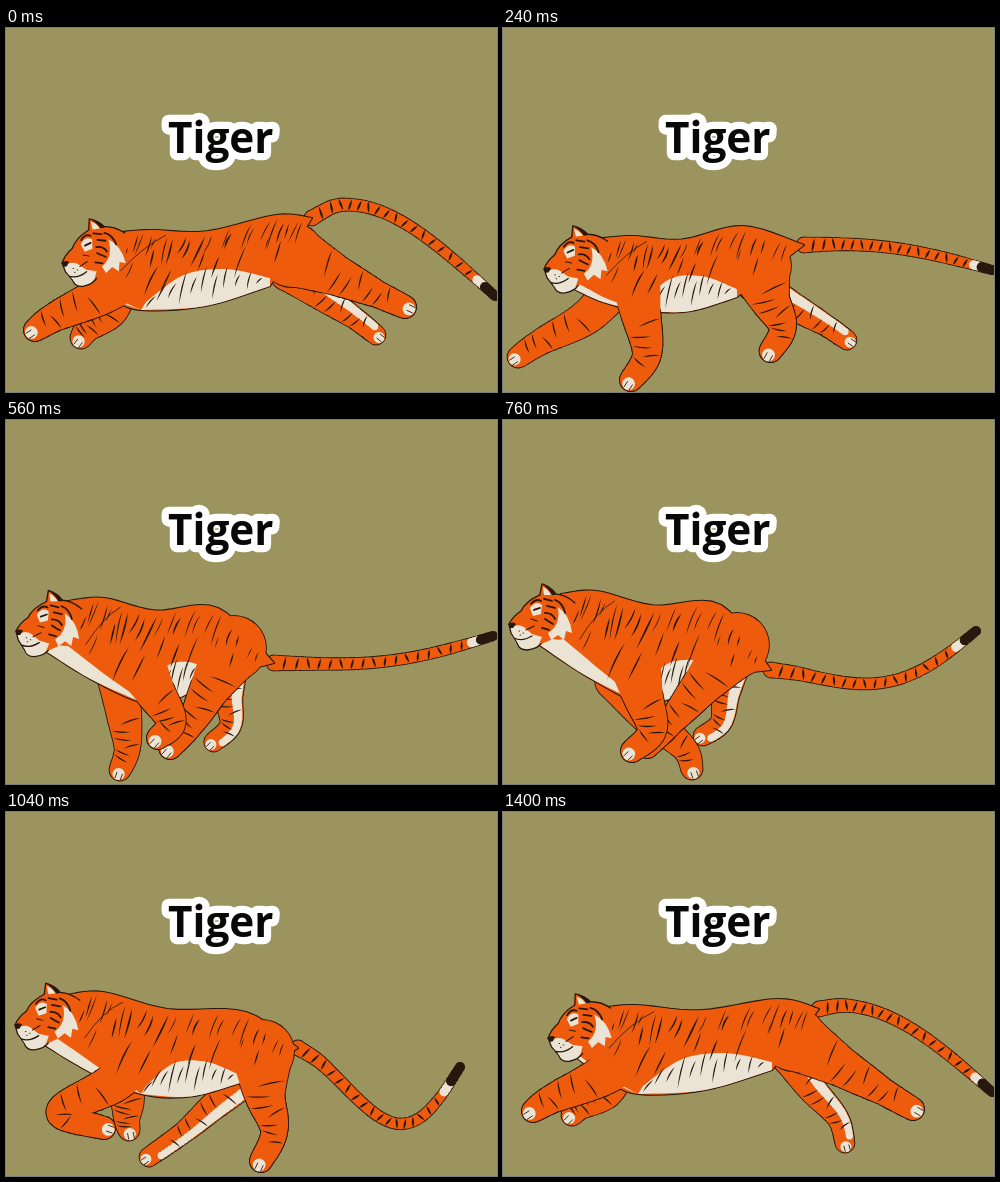
Animation, 491 px wide and 364 px high, one loop 1.44 s. Source, as an HTML page:

```html
<!DOCTYPE html>
<html lang="en">
<head>
<meta charset="utf-8">
<title>Tiger</title>
<style>
html, body { margin: 0; width: 100%; height: 100%; overflow: hidden; background: #9c945f; }
svg { display: block; width: 491px; height: 364px; }
text { font: 700 42.3px "Open Sans", sans-serif; fill: #080808; stroke: #fff; stroke-width: 14.5px; stroke-linejoin: round; paint-order: stroke; }
</style>
</head>
<body>
<svg viewBox="0 0 491 364">
  <rect width="491" height="364" fill="#9c945f"/>
  <text x="162" y="125">Tiger</text>
  <g id="cat" stroke-linecap="round" stroke-linejoin="round"></g>
  <g id="head" fill="none" stroke-linecap="round" stroke-linejoin="round">
    <path fill="#ee5b0d" d="M0 1Q4-7 12-12Q17-22 29-27L33-39Q42-36 47-29Q58-28 66-20L64 9Q56 19 44 16L30 22Q20 27 8 21L2 10Z"/>
    <path fill="#ebe4d4" d="M1 5Q8 0 15 4L23 11L33 14L30 21Q26 27 17 27Q9 26 7 20L3 13ZM49-16Q61-8 63 10L57 8L55 17L49 12L42 17L39 10Q52 2 49-16ZM21-15Q27-23 33-18L32-9L24-7ZM35-28L34-36Q40-33 42-28Z"/>
    <path stroke="#27180f" stroke-width="1.3" d="M66-20Q57-28 47-29Q42-36 33-39L31-28Q17-22 12-12Q4-7 0 1L2 10L8 20Q10 27 18 27Q28 26 32 21M5 15Q13 19 23 13"/>
    <path fill="#27180f" d="M-1 1Q4-2 7 1L4 5L1 5ZM33-39Q43-36 47-28L43-28Q39-35 33-39Z"/>
    <path stroke="#27180f" stroke-width="1.8" d="M25-13L31-15M22-19Q27-25 32-22M35-24L43-22M38-17L46-15M36-10Q43-10 46-4M36-4Q42 0 44 1M33 5L40 7M46-23Q54-20 56-10"/>
    <path stroke="#27180f" stroke-width="1" d="M10 8h.5M14 10h.5M11 12h.5M17 7L25 3M22-4L28-2"/>
  </g>
</svg>
<script>
const LOOP = 1440, STEP = 40;
const ORANGE = '#ee5b0d', CREAM = '#ebe4d4', INK = '#27180f';

// Guide points of the gallop; the rest of the body follows from them
const KEYS = [0, 240, 560, 760, 1040, 1200, 1400];
const gait = {
  nose: [[56, 234], [41, 240], [10, 210], [6, 203], [9, 212], [20, 229], [45, 225]],
  croup: [[270, 187], [240, 198], [212, 188], [218, 185], [240, 200], [280, 206], [275, 187]],
  dock: [[306, 190], [301, 217], [268, 243], [268, 250], [292, 236], [316, 213], [316, 197]],
  tailTip: [[489, 268], [489, 242], [487, 216], [473, 211], [454, 255], [478, 303], [489, 280]],
  tailSag: [[-36], [-9], [12], [34], [64], [44], [-26]],
  nearFore: [[29, 302], [130, 352], [152, 318], [130, 331], [98, 316], [32, 322], [30, 299]],
  farFore: [[75, 310], [16, 329], [116, 350], [191, 349], [123, 318], [68, 308], [69, 303]],
  fold: [[0], [8], [18], [16], [-50], [-8], [0]],
  nearHind: [[399, 279], [268, 323], [165, 328], [145, 327], [257, 349], [352, 345], [410, 297]],
  farHind: [[370, 307], [344, 312], [208, 322], [200, 316], [145, 345], [242, 344], [343, 331]]
};

const N = KEYS.length;
const cat = document.getElementById('cat'), head = document.getElementById('head');

const when = k => KEYS[(k + N) % N] + LOOP * Math.floor(k / N);

// Periodic cubic through the guide points, without overshoot
function pose(track, t) {
  let k = N - 1;
  while (KEYS[k] > t) k--;
  const h = when(k + 1) - when(k), s = (t - when(k)) / h, q = s * s * (3 - 2 * s);
  return track[0].map((_, i) => {
    const at = j => track[(j + N) % N][i];
    const slope = j => (at(j + 1) - at(j)) / (when(j + 1) - when(j));
    const tangent = j => {
      const a = slope(j - 1), b = slope(j);
      return a * b > 0 ? 2 * a * b / (a + b) : 0;
    };
    return at(k) * (1 - q) + at(k + 1) * q +
      h * s * (1 - s) * ((1 - s) * tangent(k) - s * tangent(k + 1));
  });
}

const clamp = (v, lo, hi) => Math.max(lo, Math.min(hi, v));
const add = (p, x, y) => [p[0] + x, p[1] + y];
const shift = (p, dir, d) => add(p, dir[0] * d, dir[1] * d);
const mix = (a, b, v) => [a[0] + (b[0] - a[0]) * v, a[1] + (b[1] - a[1]) * v];
const f = p => p[0].toFixed(1) + ' ' + p[1].toFixed(1);
const run = pts => 'M' + pts.map(f).join('L');
const fill = (d, c) => `<path d="${d}" fill="${c}"/>`;
const line = (d, w) => `<path d="${d}" fill="none" stroke="${INK}" stroke-width="${w}"/>`;

// Point on a smooth curve through pts, u from 0 to 1
function along(pts, u) {
  const last = pts.length - 1, k = clamp(Math.floor(u * last), 0, last - 1), s = u * last - k;
  return [0, 1].map(c => {
    const [a, b, d, e] = [-1, 0, 1, 2].map(j => pts[clamp(k + j, 0, last)][c]);
    return b + s / 2 * (d - a + s * (2 * a - 5 * b + 4 * d - e + s * (3 * (b - d) + e - a)));
  });
}
const span = (pts, a, b, n = 28) =>
  Array.from({ length: n + 1 }, (_, i) => along(pts, a + (b - a) * i / n));

// Tapered stripe, slightly bowed
function leaf(a, b, w, bow = 0) {
  const dx = b[0] - a[0], dy = b[1] - a[1], len = Math.hypot(dx, dy) || 1;
  const nrm = [-dy / len, dx / len], m = mix(a, b, .45);
  return `M${f(a)}Q${f(shift(m, nrm, bow + w))} ${f(b)}Q${f(shift(m, nrm, bow - w))} ${f(a)}Z`;
}

// Evenly spaced discs along a spine
function discs(spine, radii, n) {
  return Array.from({ length: n + 1 }, (_, i) => {
    const u = i / n, a = along(spine, Math.max(0, u - .01)), b = along(spine, Math.min(1, u + .01));
    const len = Math.hypot(b[0] - a[0], b[1] - a[1]) || 1;
    const dir = [(b[0] - a[0]) / len, (b[1] - a[1]) / len];
    const k = Math.min(radii.length - 2, Math.floor(u * (radii.length - 1)));
    const r = radii[k] + (radii[k + 1] - radii[k]) * (u * (radii.length - 1) - k);
    return { c: along(spine, u), r, dir, nrm: [-dir[1], dir[0]] };
  });
}
const ring = (p, q) =>
  `M${f(add(p, -q, 0))}a${q} ${q} 0 1 0 ${2 * q} 0a${q} ${q} 0 1 0 ${-2 * q} 0`;
const round = (list, grow = 0, side = 0, size = 1) =>
  list.map(({ c, r, nrm }) => ring(shift(c, nrm, r * side), r * size + grow)).join('');

// A planted paw points forward, so its ankle moves back
function chain(root, knee, ankle, toe) {
  const plant = clamp((toe[1] - 318) / 25, 0, 1);
  return [root, knee, add(ankle, 6 * plant, -3 * plant), add(toe, -2 * plant, 0)];
}
function foreLeg(root, toe, fold) {
  return chain(root, add(mix(root, toe, .36), 5 + fold * .3, 5), add(mix(root, toe, .8), fold, 0), toe);
}
// A shortened hind leg pushes its hock back
function hindLeg(root, toe, reach) {
  const dx = toe[0] - root[0], dy = toe[1] - root[1], d = Math.hypot(dx, dy);
  const aft = [dy / d, -dx / d], bend = Math.max(0, reach - d) * .35;
  return chain(root, shift(mix(root, toe, .38), aft, bend * .4), shift(mix(root, toe, .75), aft, bend), toe);
}

function limb(all, { edge = 0, pale = 0, from = .25 }) {
  const n = all.length - 1, end = all[n];
  let out = fill(round(all.slice(Math.round(edge * n)), .9), INK) + fill(round(all), ORANGE);
  if (pale) out += fill(round(all.slice(4, 33), -.3, pale * .58, .4), CREAM);
  out += fill(ring(shift(end.c, end.dir, end.r * .4), end.r * .58), CREAM);
  let bars = '';
  for (let u = from, i = 0; u < .8; u += .085, i++) {
    const { c, r, nrm, dir } = all[Math.round(u * n)], side = i % 3 ? 1 : -1;
    bars += leaf(shift(c, nrm, side * r * .95), shift(shift(c, nrm, -side * r * .3), dir, 4), 1.4, 1.5);
  }
  const claws = [-.35, .2].map(k => {
    const p = shift(end.c, end.nrm, end.r * k);
    return run([shift(p, end.dir, end.r * .3), shift(p, end.dir, end.r * .85)]);
  }).join('');
  return out + fill(bars, INK) + line(claws, .9);
}

function drawTail(base, tip, sag) {
  const spine = Array.from({ length: 9 }, (_, i) => {
    const u = i / 8;
    return add(mix(base, tip, u), 0, sag * Math.sin(Math.PI * u ** (1 + sag / 150)));
  });
  const n = 80, all = discs(spine, [7.5, 6, 5.6, 5.4, 5.2, 4.2], n);
  let bars = '';
  for (let i = 4; i < 71; i += 4) {
    const { c, r, nrm, dir } = all[i], side = i % 3 ? 1 : -1;
    bars += leaf(shift(c, nrm, side * r), shift(shift(c, nrm, -side * r * .9), dir, 3), 2.2);
  }
  return fill(round(all, .9), INK) + fill(round(all), ORANGE) + fill(bars, INK) +
    fill(round(all.slice(72, 76)), CREAM) + fill(round(all.slice(75), .6), INK);
}

// Fixed coat pattern
let seed = 11;
const rnd = () => (seed = seed * 16807 % 2147483647) / 2147483647;
const coat = Array.from({ length: 30 }, (_, i) => ({
  u: .17 + .76 * i / 29, v: i % 3 ? .02 + rnd() * .1 : .25 + rnd() * .25,
  len: .16 + rnd() * .25, w: .8 + rnd() * 1.1, bow: rnd() * 5 - 2.5, lean: .2 + rnd() * .35
}));

function draw(t) {
  const p = {};
  for (const name in gait) p[name] = pose(gait[name], t);
  const swing = Math.cos(2 * Math.PI * t / LOOP), chest = 11 - 8 * swing;

  const withers = add(p.nose, 88, -32), shoulder = [130, 236], brisket = [135, 282];
  const dip = add(mix(withers, p.croup, .45), 0, 8);
  const top = [add(p.nose, 52, -29), withers, dip, p.croup, p.dock];
  const hip = add(p.croup, 16, 40), groin = add(hip, -22, 31), throat = add(p.nose, 28, 20);
  const bib = [throat, add(mix(throat, brisket, .5), -2, 3), brisket];
  const belly = [brisket, add(mix(brisket, groin, .5), 0, 8), groin];
  const low = [...bib, ...belly.slice(1)];
  const flank = [add(brisket, 5, -8), add(mix(brisket, groin, .33), 0, -27),
    add(mix(brisket, groin, .66), 0, -25), add(groin, 0, -8)];
  const at = (u, v) => mix(along(top, u), along(low, u), v);

  const n = 36;
  const hind = discs(hindLeg(hip, p.nearHind, 125), [32, 20, 13, 11], n);
  const fore = discs(foreLeg(shoulder, p.nearFore, p.fold[0]), [28, 20, 14, 11], n);
  const hind2 = discs(hindLeg(add(hip, -4, 18), p.farHind, 112), [18, 14, 10.5, 9.5], n);
  const fore2 = discs(foreLeg([112, 260], p.farFore, 0), [20, 17, 12.5, 10.5], n);

  let out = drawTail(p.dock, p.tailTip, p.tailSag[0]) +
    limb(hind2, { pale: -1 }) + limb(fore2, { from: .35 });

  // Outlines go under the fills, so only the silhouette keeps them
  const trunk = run([...span(top, 0, 1), ...span(low, 1, 0)]) + 'Z';
  out += line(trunk, 2.2) + fill(round(hind, .9) + round(fore, .9), INK) + fill(trunk, ORANGE);
  out += fill(run([...span(flank, 0, 1), ...span(belly, 1, 0)]) + 'Z', CREAM);
  const collar = span(bib, 0, 1, 14);
  const inner = collar.map((q, i) => shift(q, [.75, -.7], chest * Math.cos(i / 14 * Math.PI / 2)));
  out += fill(run([...collar, ...inner.reverse()]) + 'Z', CREAM);

  let ribs = '';
  for (let i = 0; i < 11; i++) {
    const u = .12 + i * .08, a = along(flank, u), b = along(belly, u);
    ribs += leaf(mix(a, b, i % 2 ? -.1 : .15), add(mix(a, b, i % 3 ? .65 : .9), -7, 0), 1.3, 1.5);
  }
  out += fill(ribs, INK) + limb(hind, { edge: .36 }) + limb(fore, { edge: .36, from: .42 });

  const stripes = coat.map(({ u, v, len, w, bow, lean }) => {
    const a = at(u, v), drop = at(u, v + len)[1] - a[1];
    return leaf(a, add(a, -lean * drop, drop), w, bow);
  }).join('');
  const blade = `M${f(at(.34, .06))}Q${f(at(.26, .24))} ${f(at(.2, .62))}`;
  out += fill(stripes, INK) + line(blade, .8);

  cat.innerHTML = out;
  const tilt = -4 - 4 * swing;
  head.setAttribute('transform', `translate(${f(p.nose)}) rotate(${tilt.toFixed(2)})`);
}

let shown = -1;
function tick() {
  const t = Math.floor(performance.now() / STEP) * STEP % LOOP;
  if (t !== shown) draw(shown = t);
  requestAnimationFrame(tick);
}
tick();
</script>
</body>
</html>
```
